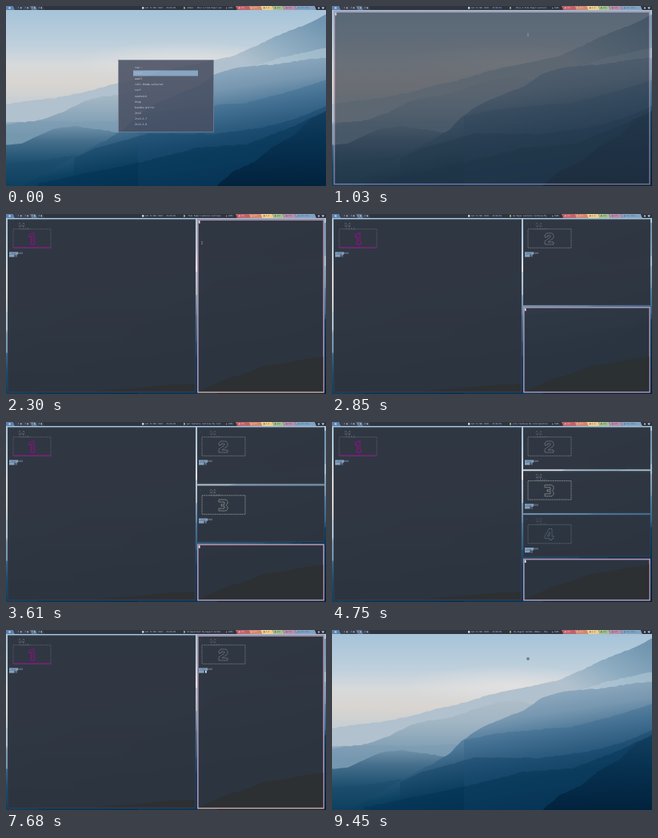
These frames come from a looping animation (400x225 px, 9480 ms). An HTML page:

```html
<!DOCTYPE html>
<html lang="en">
<head>
<meta charset="utf-8">
<title>Tiling desktop</title>
<style>
  html, body { margin: 0; width: 100%; height: 100%; overflow: hidden; background: #2e3440; }
  svg { display: block; width: 100vw; height: 100vh; }
  text { font-family: "DejaVu Sans Mono", "Liberation Mono", monospace; white-space: pre; text-rendering: geometricPrecision; }
</style>
</head>
<body>
<svg id="stage" viewBox="0 0 400 225" preserveAspectRatio="none"></svg>
<script>
const LOOP = 9480;
const stage = document.getElementById('stage');
const clamp = v => Math.max(0, Math.min(1, v));

function add(parent, tag, attrs = {}, text) {
  const node = document.createElementNS('http://www.w3.org/2000/svg', tag);
  set(node, attrs);
  if (text !== undefined) node.textContent = text;
  parent.appendChild(node);
  return node;
}
function set(node, attrs) {
  for (const key in attrs) node.setAttribute(key, attrs[key]);
}
const group = (parent = stage) => add(parent, 'g');
const show = (node, on) => set(node, { visibility: on ? 'visible' : 'hidden' });
const rect = (parent, x, y, width, height, fill) => add(parent, 'rect', { x, y, width, height, fill });
const label = (parent, x, y, text, fill = '#d8dee9', size = 2.43) =>
  add(parent, 'text', { x, y, fill, 'font-size': size }, text);

// Wallpaper
const defs = add(stage, 'defs');
function gradient(id, stops, x1 = 0, y1 = 0, x2 = 0, y2 = 225) {
  const g = add(defs, 'linearGradient', { id, gradientUnits: 'userSpaceOnUse', x1, y1, x2, y2 });
  stops.forEach(([offset, color]) => add(g, 'stop', { offset, 'stop-color': color }));
  return `url(#${id})`;
}
let seed = 7;
const random = () => (seed = seed * 16807 % 2147483647) / 2147483647;

// A ridge runs through x,y pairs with small bumps and is filled to the bottom.
function ridge(points, fill, opacity = 1) {
  let d = `M${points[0][0]} 230`;
  points.forEach(([x, y], i) => {
    const [px, py] = points[i - 1] || [x, y];
    const steps = Math.max(1, Math.round((x - px) / 4));
    for (let k = 1; k <= steps; k++) {
      const bump = (random() - .5) * 1.3;
      d += `L${(px + (x - px) * k / steps).toFixed(1)} ${(py + (y - py) * k / steps + bump).toFixed(1)}`;
    }
  });
  add(stage, 'path', { d: d + 'V230Z', fill, opacity });
}

rect(stage, 0, 0, 400, 225, gradient('sky', [[0, '#a3c2d8'], [.22, '#bfd0dc'], [.32, '#d6d9db'], [.43, '#d9d5d1'], [.58, '#c0cbd2']]));
const glow = add(defs, 'radialGradient', { id: 'glow' });
[[0, .7], [1, 0]].forEach(([offset, opacity]) => add(glow, 'stop', { offset, 'stop-color': '#e6e4e3', 'stop-opacity': opacity }));
add(stage, 'ellipse', { cx: 220, cy: 70, rx: 130, ry: 26, fill: 'url(#glow)' });

ridge([[0, 123], [30, 118], [62, 115], [100, 107], [130, 99], [165, 91], [200, 80], [240, 72], [285, 62], [312, 50], [342, 36], [370, 25], [402, 10]],
  gradient('far', [[0, '#7195b0'], [.5, '#8cabc0'], [1, '#b1c1cd']], 380, 10, 330, 90));
ridge([[290, 82], [345, 64], [402, 52]], '#bccfdc', .5);
ridge([[0, 148], [40, 143], [70, 133], [100, 118], [122, 113], [150, 109], [172, 101], [205, 91], [230, 88], [260, 95], [300, 110]],
  gradient('mist', [[.38, '#b0bec8'], [.52, '#a0b5c3'], [.64, '#86a2b6'], [.72, '#6d91a9']]));
ridge([[0, 146], [50, 144], [100, 145], [150, 143], [180, 148]], '#7c9db5', .6);
ridge([[0, 173], [20, 172], [36, 164], [60, 153], [85, 150], [108, 153], [140, 158], [190, 165]],
  gradient('left', [[.66, '#7493aa'], [.75, '#456f8c'], [.87, '#1d4f6e'], [1, '#073a55']]));
ridge([[0, 197], [40, 194], [90, 186], [150, 178]], '#1b4a6b', .4);
ridge([[18, 226], [40, 214], [70, 197], [100, 180], [130, 165], [147, 154], [162, 139], [182, 125], [205, 114],
  [240, 100], [264, 84], [285, 78], [310, 75], [337, 73], [368, 68], [402, 64]],
  gradient('slope', [[0, '#91adc2'], [.2, '#7897b0'], [.33, '#537d9c'], [.48, '#315f80'], [.66, '#0d4162'], [.85, '#022f4f'], [1, '#001f3a']],
    240, 75, 265, 240));
ridge([[165, 138], [205, 129], [250, 125], [300, 121], [350, 108], [402, 92]], '#2b5f86', .3);
ridge([[85, 190], [112, 178], [180, 159], [260, 160], [320, 152], [365, 140], [402, 124]], '#0a3a5c', .35);
ridge([[40, 222], [120, 205], [170, 195], [240, 177], [300, 173], [360, 150], [402, 130]], '#022f4f', .4);
ridge([[262, 226], [284, 207], [310, 195], [332, 177], [360, 162], [380, 142], [402, 130]],
  gradient('near', [[.58, '#123d5d'], [.8, '#052b49'], [1, '#001d36']]), .75);

// Terminal panes: [open, print, close, fade-out, text colour]
const digits = [
  'M0 2L4 0H6V11H7V14H2V11H3V4L0 5Z',
  'M0 3L2 0H9L11 2V6L4 11H11V14H0V10L7 5V3H3V5H0Z',
  'M0 0H9L11 2V5L9 7L11 9V12L9 14H0V11H7V8H3V6H7V3H0Z',
  'M5 0H9V9H11V12H9V14H6V12H0V9ZM6 4L3 9H6Z',
  'M0 0H11V3H3V5H9L11 7V12L9 14H0V11H7V8H0Z'
];
const paneLayer = group();
const panes = [
  [790, 1330, 9150, 270, '#9c0895'],
  [1650, 2370, 8300, 220, '#989ca0'],
  [2500, 3180, 7060, 120, '#c8c9c3'],
  [3240, 3900, 6250, 0, '#718391'],
  [4210, 5050, 5530, 0, '#8d9d9e']
].map(([open, print, close, fade, color], i) => {
  const root = group(paneLayer);
  const back = rect(root, 0, 0, 1, 1, '#2d3540');
  back.setAttribute('fill-opacity', .98);
  const frame = add(root, 'rect', { fill: 'none' });
  const foot = add(root, 'path', { stroke: '#bd9075', 'stroke-width': 1.6 });
  const cursor = rect(root, 2, 2, 1.7, 3.4, '#d8dee9');
  return { open, print, close, fade, root, back, frame, foot, cursor, output: drawOutput(root, i, color) };
});

function drawOutput(root, i, color) {
  const out = group(root);
  const left = i ? 6 : 7, width = i ? 54 : 47;
  const line = i ? color : '#77717f';
  label(out, 3.5, 6, '~', i ? '#9aa3ae' : '#bf4665');
  [' /\\_/\\', ' (o.o)', '--(_)_(_)--'].forEach((row, k) =>
    label(out, i ? 14 : 12, 6 + k * 3, row, i ? color : '#b9bdc7', 2.7));
  add(out, 'rect', { x: left, y: 12.3, width, height: 23.5, fill: 'none', stroke: line, 'stroke-width': .6, 'stroke-dasharray': '1 .55' });
  if (!i) rect(out, left, 35, width, .9, color);
  add(out, 'path', { d: digits[i], transform: 'translate(27 17.5)', fill: 'none', stroke: color,
    'stroke-width': i ? .65 : 1, 'stroke-dasharray': i ? '1.1 .45' : 'none' });
  rect(out, 2, 41, 11, 3.2, '#81a1c1');
  rect(out, 2, 44.2, 6.5, 3, '#81a1c1');
  rect(out, 13, 41.3, 6, 2.2, '#566072');
  label(out, 3, 43.5, '~/home', '#3b4252', 2.1);
  return out;
}

const haze = add(stage, 'path', { fill: '#2d2f2e',
  d: 'M115 221.5L150 218L180 216L205 213L236 212V221.5ZM241 221.5L258 214L275 206L300 199L322 190L345 187L370 182L396.5 178V221.5Z' });

const pointer = group();
const beam = add(pointer, 'path', { d: 'M244.2 34.6H245.8M245 34.6V37.6M244.2 37.6H245.8', stroke: '#aab1bb', 'stroke-width': .5 });
const ring = add(pointer, 'circle', { cx: 245, cy: 36, r: 1.4, fill: '#8b98a5', stroke: '#5d6873', 'stroke-width': .8 });

// Launcher
const launcher = group();
set(rect(launcher, 140.5, 67.5, 119, 90, '#484f62'), { stroke: '#7b8496', 'stroke-width': .8 });
rect(launcher, 159, 80.5, 81, 7, '#81a1c1');
['run :', 'xterm', 'awall', 'rofi-theme-selector', 'surf', 'neofetch', 'htop', 'bundle-mirror', '2to3', '2to3-2.7', '2to3-3.8']
  .forEach((row, i) => label(launcher, 161, 78 + i * 7.1, row, i === 1 ? '#a9c0d5' : '#e5e9f0', 3.15));

// Top bar
const bar = group();
const slant = (x, width, fill) => add(bar, 'path', { d: `M${x} 0H${x + width}L${x + width + 2} 5H${x + 2}Z`, fill });
rect(bar, 0, 0, 400, 5, '#2e3440');
slant(10, 36, '#3b4252');
slant(30, 7, '#5b708c');
slant(-2, 11, '#5e81ac');
add(bar, 'circle', { cx: 4.5, cy: 2.4, r: 1.2, fill: '#c9d8e8' });
['1 \u25a0', '2 \u25a0', '3 \u25a0', '4 \u25a0'].forEach((text, i) => label(bar, 15 + i * 8.5, 3.4, text));
rect(bar, 170, 1.2, 2.4, 2.4, '#d8dee9');
const clock = label(bar, 174, 3.4, '');
rect(bar, 222, 1.2, 1.8, 2.4, '#a3be8c');
const marquee = label(bar, 226, 3.4, '');
label(bar, 275, 3.4, '\u25b2 100%');
[[287, 16, '#bf616a'], [303, 15, '#d08770'], [318, 15, '#ebcb8b'], [333, 13, '#a3be8c'], [346, 15, '#b48ead'], [361, 25, '#81a1c1'], [386, 16, '#2e3440']]
  .forEach(([x, width, color]) => slant(x, width, color));
['\u25a0 45%', '\u25a0 38\u00b0C', '\u25a0 1.2', '\u25a0 64%'].forEach((text, i) =>
  label(bar, [291, 306, 322, 336][i], 3.4, text, i < 2 ? '#f0d5d2' : '#4c566a'));
const load = label(bar, 350, 3.4, '', '#6b5368');
label(bar, 365, 3.4, '\u25a0 192 KB/s', '#4c6a88');
add(bar, 'circle', { cx: 391, cy: 2.5, r: 1, fill: '#d8dee9' });
add(bar, 'path', { d: 'M394.5 1.4H398L396.2 4Z', fill: '#d8dee9' });

const song = '<Ember - Moss & Tide Paper Lanterns Continue My Cold Question2 My August Garden ';

function placePane(pane, x, y, width, height, focused) {
  set(pane.root, { transform: `translate(${x} ${y})` });
  set(pane.back, { width, height });
  set(pane.frame, { x: .8, y: .8, width: width - 1.6, height: height - 1.6,
    stroke: focused ? '#b493ae' : '#3b4252', 'stroke-width': focused ? 1.6 : .6 });
  set(pane.foot, { d: `M.5 ${height - .8}H${width - .5}` });
}

function render(t) {
  const alive = panes.filter(p => t >= p.open && t < p.close);
  const newest = alive[alive.length - 1];
  const rows = Math.max(1, alive.length - 1);
  const height = (217 - (rows - 1) * 2) / rows;

  panes.forEach((p, i) => {
    const living = alive.includes(p);
    const alpha = living ? clamp((t - p.open) / 370)
      : t >= p.close && p.fade ? clamp(1 - (t - p.close) / p.fade) : 0;
    p.alpha = alpha;
    set(p.root, { opacity: alpha });
    show(p.output, t >= p.print);
    show(p.foot, i === 1 && (!living || rows === 1) && (p === newest || !living));
    const focused = p === newest || !living;
    if (i === 0) placePane(p, 2, 6.5, alive.length > 1 ? 235 : 396, 217, focused);
    else if (living) placePane(p, 239, 6.5 + (i - 1) * (height + 2), 159, height, focused);
    else {
      const full = (217 - (i - 1) * 2) / i;
      placePane(p, 239, 6.5 + (i - 1) * (full + 2), 159, full, true);
    }
    const printed = t >= p.print;
    set(p.cursor, { x: printed ? 10 : 1.8, y: printed ? 44.4 : 1.8, height: printed ? 2.8 : 3.4,
      fill: focused ? '#e5e9f0' : 'none', stroke: focused ? 'none' : '#aab1bb', 'stroke-width': .4 });
  });

  set(haze, { opacity: .7 * panes[1].alpha });
  show(beam, t >= 790 && t < 2370);
  show(ring, t >= 9150);
  set(launcher, { opacity: t < 380 ? .87 + .1 * clamp(t / 150) : .97 * clamp(1 - (t - 380) / 300) });

  const second = Math.floor(t / 1000 + .46);
  clock.textContent = `Sat 21 Mar 2020 - 22:00:0${second}`;
  const shift = Math.floor(t / 152);
  marquee.textContent = (song + song).slice(shift, shift + 30);
  load.textContent = `\u25a0 ${[12, 14, 9, 17, 11, 13][Math.floor(t / 730) % 6]}%`;
}

const start = performance.now();
function tick() {
  render((performance.now() - start) % LOOP);
  requestAnimationFrame(tick);
}
render(0);
requestAnimationFrame(tick);
</script>
</body>
</html>
```
